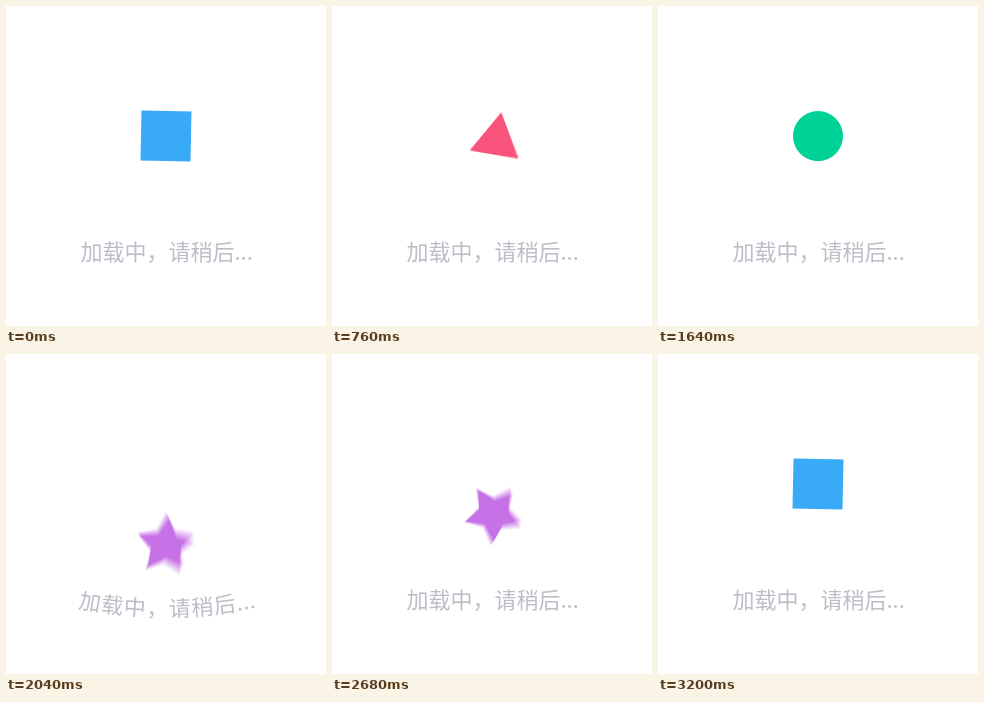
Recreate the animation shown at these times as an HTML page with a canvas. Size 320x320 px, loop 3240 ms.

```html
<!DOCTYPE html>
<html lang="zh">
<head>
<meta charset="utf-8">
<style>
html, body { margin: 0; width: 100%; height: 100%; overflow: hidden; background: #fff; }
canvas { display: block; }
</style>
</head>
<body>
<canvas id="stage" width="320" height="320"></canvas>
<script>
const LOOP = 3240, CYCLE = 800, HALF = 400, STEP = 40;
const ctx = document.getElementById('stage').getContext('2d');
const layer = document.createElement('canvas');
layer.width = layer.height = 320;
const pen = layer.getContext('2d');
const RAD = Math.PI / 180;

// Points alternate between the given radii, starting at angle `turn` from straight up.
function polygon(count, radii, turn, cx = 0, cy = 0) {
  for (let i = 0; i < count; i++) {
    const a = (turn - 90 + 360 * i / count) * RAD, r = radii[i % radii.length];
    pen.lineTo(cx + r * Math.cos(a), cy + r * Math.sin(a));
  }
}

const shapes = [
  { color: '#39abf6', path: () => pen.rect(-25, -25, 50, 50) },
  { color: '#f8537a', path: () => polygon(3, [28.6], 0, 5.2, 3.6) },
  { color: '#00d197', path: () => pen.arc(0, 0, 25, 0, 7) },
  { color: '#c771e6', path: () => polygon(10, [29.7, 15.5], 18, 2.3, -1.6) }
];

// 0 at the top of the bounce, 1 at the bottom.
function fall(t) {
  const phase = (t + CYCLE) % CYCLE;
  return 1 - Math.abs(phase - HALF) / HALF;
}

// Averages several poses within the shutter time for motion blur.
function drawShape(t) {
  const shape = shapes[Math.floor((t + HALF) / CYCLE) % shapes.length];
  const samples = 16, shutter = 20;
  pen.globalCompositeOperation = 'source-over';
  pen.clearRect(0, 0, 320, 320);
  pen.globalCompositeOperation = 'lighter';
  pen.fillStyle = `rgba(0,0,0,${16 / 255})`;
  for (let i = 0; i < samples; i++) {
    const r = fall(t + ((i + 0.5) / samples - 0.5) * shutter);
    pen.save();
    pen.translate(160, 130 + 80 * r ** 3);
    pen.rotate((90 * r + 60 * r * r) * RAD);
    pen.beginPath();
    shape.path();
    pen.closePath();
    pen.fill();
    pen.restore();
  }
  pen.globalCompositeOperation = 'source-in';
  pen.fillStyle = shape.color;
  pen.fillRect(0, 0, 320, 320);
  ctx.drawImage(layer, 0, 0);
}

const bends = [[0, 0], [360, 0], [400, 18], [500, -9], [600, 8], [700, 0], [800, 0]];

function bendAt(phase) {
  const i = bends.findIndex(k => k[0] > phase);
  const [t0, b0] = bends[i - 1], [t1, b1] = bends[i];
  const s = (phase - t0) / (t1 - t0);
  return b0 + (b1 - b0) * s * s * (3 - 2 * s);
}

function drawText(t) {
  const bend = bendAt(t % CYCLE);
  ctx.font = '300 22px "Noto Sans CJK SC", "Noto Sans CJK", sans-serif';
  ctx.fillStyle = '#bbbec6';
  let x = 74.5;
  for (const ch of '加载中，请稍后...') {
    const w = ctx.measureText(ch).width, mid = x + w / 2, u = (mid - 160) / 85;
    ctx.save();
    ctx.translate(mid + u * Math.max(0, bend) * 0.22, 247 + bend * (1 - u * u));
    ctx.rotate(Math.atan(-2 * bend * u / 85));
    ctx.fillText(ch, -w / 2, 7);
    ctx.restore();
    x += w;
  }
}

function draw(now) {
  const t = Math.floor(now % LOOP / STEP) * STEP % (shapes.length * CYCLE);
  ctx.fillStyle = '#fff';
  ctx.fillRect(0, 0, 320, 320);
  drawText(t);
  drawShape(t);
}

const start = performance.now();
function tick() {
  draw(performance.now() - start);
  requestAnimationFrame(tick);
}
tick();
</script>
</body>
</html>
```
